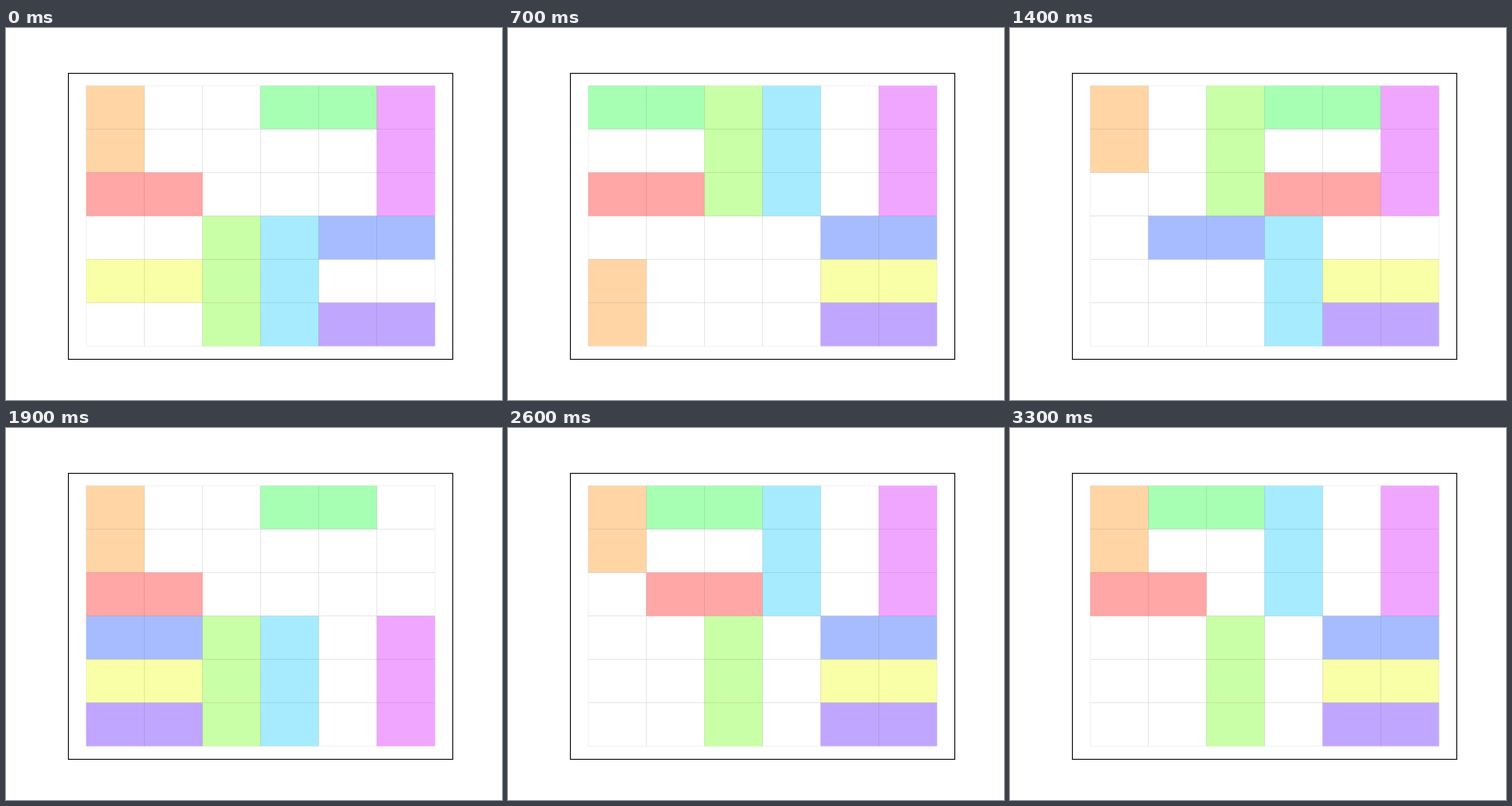
Recreate the animation shown at these times as a matplotlib script. Size 640 px wide and 480 px high, loop 3400 ms.

```python
import matplotlib.pyplot as plt
from matplotlib.animation import FuncAnimation
from matplotlib.patches import Rectangle

SIZE = 6
FILL_ALPHA = 0.35
EMPTY = (1, 1, 1, 0)

# name: (hue index, fixed lane, length, vertical)
CARS = {
    "R": (0, 2, 2, False),
    "O": (1, 0, 2, True),
    "Y": (2, 4, 2, False),
    "L": (3, 2, 3, True),
    "G": (4, 0, 2, False),
    "C": (6, 3, 3, True),
    "B": (7, 3, 2, False),
    "P": (8, 5, 2, False),
    "M": (9, 5, 3, True),
}

START = "O0 R0 G3 M0 L3 C3 B4 Y0 P4"

# Each step slides the named cars to new offsets along their lanes.
STEPS = [
    "G1", "C0", "L2", "L1",
    "Y4 L3", "R1 O4", "G0 R0 L0", "B0 C3", "L3 G3 R3", "L0 B1",
    "B0", "B1", "O2", "O0",
    "B0 L3", "R0 G1", "C0 L1", "Y0 P0", "C3 L3 G3 M3",
    "M0 G1 L1 C0", "Y4 P4", "L3 C3 G3", "R3 L0 B1", "O4 B0 L3",
    "R0 G0 L0 C0 B4", "L3 R1 G1 O0",
    "O4", "B3", "P3", "P4", "O0", "B4", "R0",
]


def slide(state, moves):
    """Return the state after a string of moves such as 'G1 C0'."""
    return {**state, **{m[0]: int(m[1]) for m in moves.split()}}


def color(index):
    return (*plt.cm.hsv(index / 11)[:3], FILL_ALPHA)


def occupied(state):
    """Map (row, col) to the colour of the car standing there."""
    board = {}
    for name, offset in state.items():
        hue, lane, length, vertical = CARS[name]
        for pos in range(offset, offset + length):
            board[(pos, lane) if vertical else (lane, pos)] = color(hue)
    return board


states = [slide({}, START)]
for step in STEPS:
    states.append(slide(states[-1], step))
boards = [occupied(s) for s in states]

fig, ax = plt.subplots(figsize=(6.4, 4.8), dpi=100)
ax.set_xlim(-0.3, SIZE + 0.3)
ax.set_ylim(SIZE + 0.3, -0.3)
ax.set_xticks([])
ax.set_yticks([])

cells = {}
for row in range(SIZE):
    for col in range(SIZE):
        cells[row, col] = ax.add_patch(
            Rectangle((col, row), 1, 1, fc=EMPTY, ec=(0, 0, 0, 0.05), lw=0.72))


def update(i):
    for key, cell in cells.items():
        cell.set_facecolor(boards[i].get(key, EMPTY))
    return list(cells.values())


anim = FuncAnimation(fig, update, frames=len(boards), interval=100,
                     repeat=True, blit=False)
plt.show()
```
